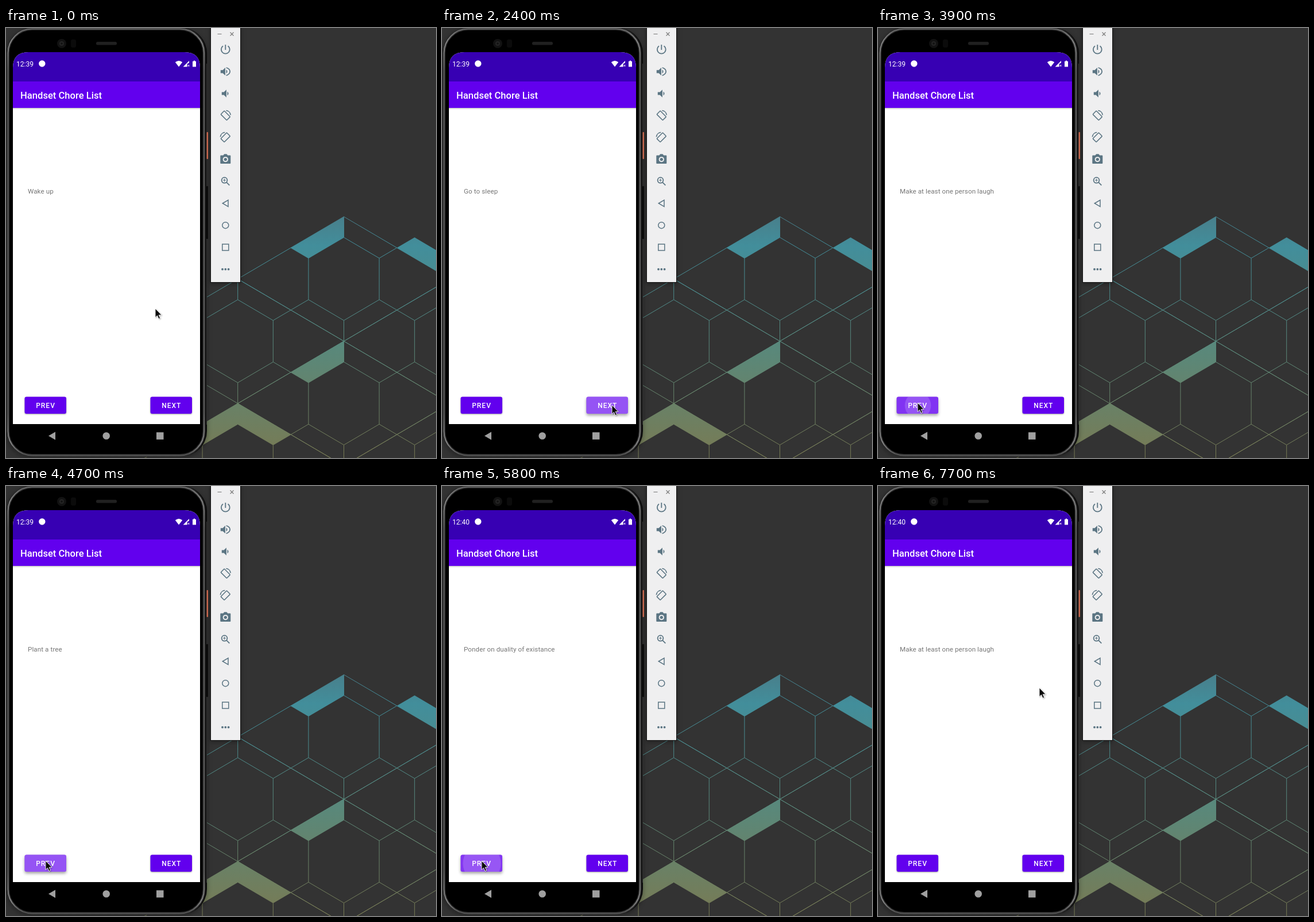
Animation of 749 by 748 pixels, one loop 8000 ms. Source, as an HTML page:

```html
<!DOCTYPE html>
<html lang="en">
<head>
<meta charset="utf-8">
<title>Todo app in a phone emulator</title>
<style>
  html, body { margin: 0; width: 100%; height: 100%; overflow: hidden; background: #333; }
  svg { display: block; width: 100vw; height: 100vh; font-family: Roboto, sans-serif; }
  .label { font-weight: 500; font-size: 12px; letter-spacing: 1px; fill: #fff; }
  .window { filter: drop-shadow(0 2px 4px rgba(0, 0, 0, .35)); }
</style>
</head>
<body>
<svg viewBox="0 0 749 748">
  <defs>
    <linearGradient id="wall" gradientUnits="userSpaceOnUse" x1="0" y1="330" x2="0" y2="740">
      <stop offset="0" stop-color="#48808c"/>
      <stop offset=".12" stop-color="#428e9b"/>
      <stop offset=".6" stop-color="#5c8777"/>
      <stop offset="1" stop-color="#777b55"/>
    </linearGradient>
    <linearGradient id="rim" x1="0" x2="0" y1="0" y2="1">
      <stop offset="0" stop-color="#666"/>
      <stop offset=".03" stop-color="#8c8c8c"/>
      <stop offset=".1" stop-color="#5c5c5c"/>
      <stop offset=".9" stop-color="#5c5c5c"/>
      <stop offset=".97" stop-color="#8c8c8c"/>
      <stop offset="1" stop-color="#555"/>
    </linearGradient>
    <linearGradient id="barShadow" x1="0" x2="0" y1="0" y2="1">
      <stop offset="0" stop-opacity=".22"/>
      <stop offset="1" stop-opacity="0"/>
    </linearGradient>
    <clipPath id="screen"><path d="M12 69Q12 42 39 42H311Q338 42 338 69V689H12z"/></clipPath>
    <clipPath id="buttonClip"><rect width="72.5" height="29.5" rx="3.3"/></clipPath>
  </defs>

  <rect width="749" height="748" fill="#333"/>
  <g stroke="url(#wall)" fill="none">
    <path id="lines" stroke-width="1"/>
    <path id="tiles" fill="url(#wall)" stroke="none"/>
  </g>

  <!-- phone body -->
  <rect class="window" x="1" y="0" width="349" height="745" rx="44" fill="#0a0a0a"/>
  <rect x="3.5" y="1.5" width="341.5" height="742" rx="42" fill="#000" stroke="#2c2c2c" stroke-width="5"/>
  <rect x="3.5" y="1.5" width="341.5" height="742" rx="42" fill="none" stroke="url(#rim)" stroke-width="1.8"/>
  <path d="M349.5 62V690" stroke="#333"/>
  <rect x="349.5" y="181" width="2.5" height="47" rx="1" fill="#cf6a50"/>
  <rect x="349" y="275" width="3" height="92" rx="1" fill="#0c0c0c"/>
  <circle cx="97" cy="27" r="8" fill="#121212"/>
  <circle cx="97" cy="27" r="4" fill="#242424"/>
  <circle cx="97" cy="27" r="1.8" fill="#111"/>
  <rect x="113" y="20" width="9" height="14" rx="3" fill="#0b0b0b"/>
  <rect x="157" y="24" width="36" height="5.5" rx="2.5" fill="#202020"/>

  <!-- app -->
  <g clip-path="url(#screen)">
    <rect x="12" y="42" width="326" height="647" fill="#fff"/>
    <rect x="12" y="42" width="326" height="51" fill="#3700b3"/>
    <rect x="12" y="93" width="326" height="46" fill="#6200ee"/>
    <rect x="12" y="139" width="326" height="3" fill="url(#barShadow)"/>
  </g>
  <g fill="#fff">
    <text id="clock" x="18" y="66.5" font-size="12"></text>
    <circle cx="62.8" cy="62" r="5.7"/>
    <path d="M301 67.5L294.8 59.5Q301 54.5 307.2 59.5z"/>
    <path d="M308.5 67.5L319 57V60.5L315.5 62.5V67.5z"/>
    <path d="M316.5 64l3 3m0-3l-3 3" stroke="#fff" stroke-width="1"/>
    <path d="M325 58h1.7v-1.2h2.6V58H331v9.5h-6z"/>
    <text x="25" y="123" font-size="16.6" font-weight="500">Handset Chore List</text>
  </g>
  <text id="todo" x="38" y="288.3" font-size="11.6" letter-spacing=".1" fill="#757575"></text>
  <g id="buttons"></g>
  <g fill="#a0a0a0">
    <path d="M74 709.5L86 702.5V716.5z"/>
    <circle cx="174.7" cy="709.5" r="6.3"/>
    <rect x="262" y="703.3" width="12.5" height="12.5"/>
  </g>

  <!-- emulator toolbar -->
  <rect class="window" x="356.5" y="-2" width="52" height="444.5" fill="#efeff0" stroke="#111"/>
  <path d="M368.5 10.5h7M390.5 7.5l6 6m0-6l-6 6" stroke="#777" stroke-width="1.1"/>
  <g transform="translate(382.3 0)" stroke="#5b7583" fill="none" stroke-width="1.8">
    <path d="M0 29V38M-4.3 31.3A7.4 7.4 0 1 0 4.3 31.3"/>
    <g fill="#5b7583" stroke="none">
      <path id="speaker" d="M-8.5 73.2h3.7l4.4-4.2v13.6l-4.4-4.2h-3.7zM1.2 72.3q4.2 3.5 0 7z"/>
      <use href="#speaker" x="2" y="38.2"/>
      <path fill-rule="evenodd" d="M-8 221.5h4l2-2.3H2l2 2.3H8q1 0 1 1V235q0 1-1 1H-8q-1 0-1-1V222.5q0-1 1-1zM0 224a4.6 4.6 0 1 0 .01 0z"/>
      <circle cy="228.6" r="2.7"/>
      <circle cx="-5.3" cy="419.7" r="1.9"/><circle cy="419.7" r="1.9"/><circle cx="5.3" cy="419.7" r="1.9"/>
    </g>
    <path d="M1.3 69Q8 71 7.8 75.8T1.3 82.6"/>
    <g id="rotate" transform="translate(0 152.3)" stroke-width="1.6">
      <rect x="-4.3" y="-7.3" width="8.6" height="14.6" rx="1" transform="rotate(-45)"/>
      <path d="M1-8.8A9 9 0 0 1 9-1"/>
    </g>
    <use href="#rotate" transform="translate(0 38) scale(-1 1)"/>
    <circle cx="-1.8" cy="264.8" r="4.9"/>
    <path d="M2 268.6l5 5"/>
    <path d="M-4.3 264.8h5m-2.5-2.5v5" stroke-width="1.1"/>
    <path d="M-5 305L4.7 299.3V310.7z" stroke-width="1.5"/>
    <circle cy="343.2" r="5.5" stroke-width="1.5"/>
    <rect x="-5.5" y="376" width="11" height="11" stroke-width="1.5"/>
  </g>

  <path id="cursor" d="M0 0V15.5L3.5 12.3 6 18 8.6 16.9 6.2 11.3H11z" fill="#0a0a0a" stroke="#fff" stroke-width=".9"
        style="filter: drop-shadow(1px 1px 1px rgba(0,0,0,.3))"/>
</svg>
<script>
  const LOOP = 8000, STEP = 100;
  const el = id => document.getElementById(id);
  const clamp01 = v => Math.min(1, Math.max(0, v));
  const smooth = v => v * v * (3 - 2 * v);

  // Wallpaper: a lattice of cells, each a hexagon inside a rhombus; u and v are its half steps.
  const u = 61.6, v = 36.1;
  const poly = (col, row, points) => 'M' + points.map(([a, b]) =>
    [588.5 + (3 * col + a) * u, 436.5 + (3 * row + b) * v]).join('L');
  const cells = [[0, 0], [-1, 1], [1, 1], [0, 2], [-1, 3], [1, 3]];
  el('lines').setAttribute('d', cells.map(([col, row]) => {
    let d = poly(col, row, [[0, -2], [1, -1], [1, 1], [0, 2], [-1, 1], [-1, -1]]) + 'z'
          + poly(col, row, [[0, -3], [3, 0], [0, 3], [-3, 0]]) + 'z'
          + poly(col, row, [[0, -3], [0, -2]]) + poly(col, row, [[0, 3], [0, 2]]);
    for (const sx of [-1, 1]) for (const sy of [-1, 1])
      d += poly(col, row, [[sx, sy], [sx * 1.5, sy * 1.5]]);
    return d;
  }).join(''));
  const tile = (col, row, sx, sy) =>
    poly(col, row, [[0, 3 * sy], [0, 2 * sy], [sx, sy], [1.5 * sx, 1.5 * sy]]) + 'z';
  el('tiles').setAttribute('d', tile(0, 0, -1, -1) + tile(1, -1, -1, 1)
    + tile(0, 2, -1, -1) + tile(-1, 3, -1, -1) + tile(-1, 3, 1, -1));

  // Buttons: `lit` is the time span of the pressed tint, `end` the start of a ripple's fade.
  const todos = ['Wake up', 'Plant a tree', 'Ponder on duality of existance',
                 'Go to sleep', 'Make at least one person laugh'];
  const prevPresses = [3790, 4080, 4400, 4730, 5020, 5320, 5640, 5950, 6250, 6550];
  const nextChanges = [1670, 1970, 2400, 2900];
  const prevChanges = prevPresses.map(p => p + 150);

  const buttons = [
    { text: 'PREV', x: 32.5, touch: [37, 15], lit: [3650, 6750],
      ripples: prevPresses.map(start => ({ start, end: start + 300 })) },
    { text: 'NEXT', x: 251.5, touch: [44, 15], lit: [1500, 2900],
      ripples: [{ start: 1520, end: 1820 }, { start: 1820, end: 2120 }, { start: 2130, end: 2900 }] }
  ];
  el('buttons').innerHTML = buttons.map(b => `
    <g transform="translate(${b.x} 641.5)">
      <rect class="base" width="72.5" height="29.5" rx="3.3" fill="#6200ee"/>
      <g clip-path="url(#buttonClip)" fill="#fff">
        <rect class="tint" width="72.5" height="29.5"/>
        ${b.ripples.map(() => `<circle cx="${b.touch[0]}" cy="${b.touch[1]}"/>`).join('')}
      </g>
      <text class="label" x="19.7" y="19.6">${b.text}</text>
    </g>`).join('');
  buttons.forEach((b, i) => {
    const group = el('buttons').children[i];
    b.base = group.querySelector('.base');
    b.tint = group.querySelector('.tint');
    b.circles = group.querySelectorAll('circle');
  });

  function drawButton(b, t) {
    const level = clamp01((t - b.lit[0]) / 150) * clamp01(1 - (t - b.lit[1]) / 250);
    b.tint.setAttribute('opacity', 0.2 * level);
    b.base.style.filter =
      `drop-shadow(0 ${1 + 2 * level}px ${1.2 + 1.3 * level}px rgba(0,0,0,.36))`;
    b.ripples.forEach(({ start, end }, i) => {
      b.circles[i].setAttribute('r', Math.min(50, Math.max(0, (t - start) * 0.207)));
      b.circles[i].setAttribute('opacity', 0.16 * clamp01(1 - (t - end) / 200));
    });
  }

  const cursorPath = [[0, 260, 488], [800, 296, 656], [2900, 296, 656], [3500, 69, 652],
                      [6780, 69, 652], [7200, 350, 182], [7700, 281, 351], [LOOP, 281, 351]];
  function cursorAt(t) {
    const i = cursorPath.findIndex(p => p[0] > t);
    const [t0, x0, y0] = cursorPath[i - 1], [t1, x1, y1] = cursorPath[i];
    const k = smooth((t - t0) / (t1 - t0));
    return [x0 + (x1 - x0) * k, y0 + (y1 - y0) * k];
  }

  function draw(now) {
    const t = Math.floor((now % LOOP) / STEP) * STEP;
    const count = times => times.filter(x => x <= t).length;
    const index = count(nextChanges) - count(prevChanges) + 2 * todos.length;
    el('todo').textContent = todos[index % todos.length];
    el('clock').textContent = t < 5600 ? '12:39' : '12:40';
    buttons.forEach(b => drawButton(b, t));
    el('cursor').setAttribute('transform', `translate(${cursorAt(t)})`);
  }

  const began = performance.now();
  (function tick() {
    draw(performance.now() - began);
    requestAnimationFrame(tick);
  })();
</script>
</body>
</html>
```
